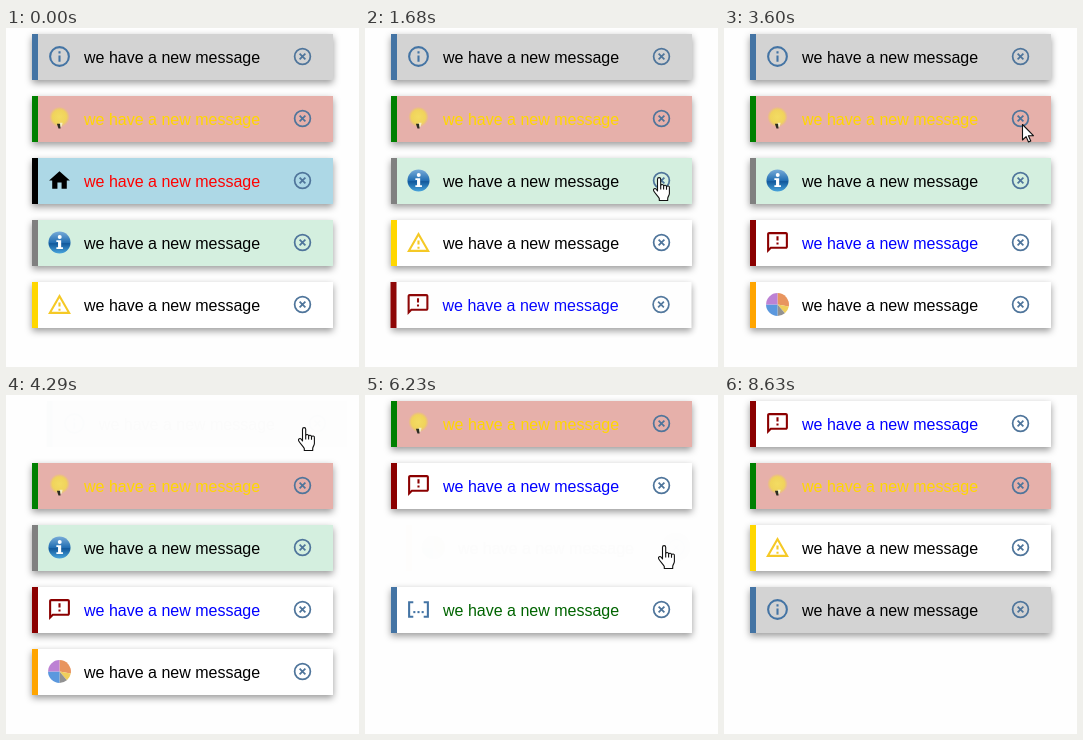
Animation, 353 px wide and 339 px high, one loop 9.87 s. Source, as an HTML page:

```html
<!DOCTYPE html>
<html lang="en">
<head>
<meta charset="utf-8">
<title>Toast messages</title>
<style>
  html, body { margin: 0; width: 100%; height: 100%; overflow: hidden; background: #fefefe; }
  #stage { position: relative; width: 353px; height: 339px; overflow: hidden; }
  .toast {
    position: absolute; left: 26px; top: 0; width: 301px; height: 46px;
    box-sizing: border-box; border-left: 6px solid;
    box-shadow: 0 3px 7px rgba(0, 0, 0, .4);
    font: 16px/48px "Liberation Sans", Arial, sans-serif;
  }
  .toast span { position: absolute; left: 46px; top: 0; white-space: nowrap; }
  .toast svg { position: absolute; }
  .icon { left: 9px; top: 10px; width: 25px; height: 25px; }
  .close {
    position: absolute; left: 250px; top: 8px; width: 28px; height: 28px; border-radius: 50%;
  }
  .close.hover { background: rgba(70, 130, 180, .16); }
  .close svg { left: 3.5px; top: 3.5px; width: 21px; height: 21px; }
  #cursor { position: absolute; left: -.5px; top: 0; }
  #cursor path { fill: #fff; stroke: #111; stroke-width: 1.1; stroke-linejoin: round; }
</style>
</head>
<body>
<div id="stage">
  <svg id="cursor" width="20" height="27" viewBox="0 0 20 27">
    <path id="arrow" d="M6.5 1.5V17l3.6-3.4 2.4 5.4 2.3-1-2.4-5.3h5z"/>
    <g id="hand">
      <path d="M5.5 15V3.2a1.6 1.6 0 0 1 3.2 0V9.6a1.5 1.5 0 0 1 2.9.2v.5a1.5 1.5 0 0 1 2.9.3v.6a1.4 1.4 0 0 1 2.9.5V17.5c0 2-1.7 3.2-1.7 5V24.5H7.3V22.5C6 20 3.3 17.8 1.6 14.8 1 13 3 11.8 4.2 13.2z"/>
      <path d="M8.7 9.5v4M11.6 10.3v3.2M14.5 11v2.7"/>
    </g>
  </svg>
</div>
<script>
const LOOP = 9870, FADE = 300, SHIFT = 15, ROW = 62, REFILL = 8240;
const stage = document.getElementById('stage');
const cursor = document.getElementById('cursor');
const arrow = document.getElementById('arrow');
const hand = document.getElementById('hand');
const blue = '#4474a4';

const svg = (body, cls = '') => `<svg class="${cls}" viewBox="0 0 24 24">${body}</svg>`;
const glyph = (color, d) => `<path fill="${color}" d="${d}"/>`;
const disc = (x, y, r, fill) => `<circle cx="${x}" cy="${y}" r="${r}" fill="${fill}"/>`;
const ring = color => `<circle cx="12" cy="12" r="9" fill="none" stroke="${color}" stroke-width="2"/>`;
const wedge = (color, a, b) => {
  const at = deg => {
    const r = deg * Math.PI / 180;
    return `${12 + 11 * Math.sin(r)} ${12 - 11 * Math.cos(r)}`;
  };
  return glyph(color, `M12 12L${at(a)}A11 11 0 0 1 ${at(b)}z`);
};

const icons = {
  info: ring(blue) + glyph(blue, 'M11 7h2v2h-2zM11 11h2v6h-2z'),
  bulb: `<radialGradient id="glow"><stop stop-color="#f3dc62"/><stop offset=".72" stop-color="#f0d35c"/>
    <stop offset="1" stop-color="#eec46c" stop-opacity=".25"/></radialGradient>` +
    disc(12, 10.5, 9.5, 'url(#glow)') + glyph('#f6efc4', 'M12 16h3l-1 4h-2z') +
    glyph('#2b2b22', 'M9.5 17h3l.5 4.5h-2z'),
  home: glyph('#000', 'M10 20v-6h4v6h5v-8h3L12 3 2 12h3v8z'),
  ball: `<linearGradient id="sky" x2="0" y2="1"><stop stop-color="#79acd9"/>
    <stop offset=".5" stop-color="#236fb3"/><stop offset=".55" stop-color="#12599c"/>
    <stop offset="1" stop-color="#48a4dc"/></linearGradient>` +
    disc(12, 12, 10.6, 'url(#sky)') + disc(12.2, 6.7, 1.9, '#fff') +
    glyph('#fff', 'M9 9.8h4.6v6.7h1.7v1.7H9v-1.7h1.6v-5H9z'),
  warn: glyph('#f5c926', 'M12 6L19.5 19h-15L12 6M12 2L1 21h22L12 2zm1 14h-2v2h2v-2zm0-6h-2v4h2v-4z'),
  note: glyph('#8b0000', 'M20 2H4c-1.1 0-2 .9-2 2v18l4-4h14c1.1 0 2-.9 2-2V4c0-1.1-.9-2-2-2zm0 14H5.2L4 17.2V4h16zM11 12h2v2h-2zM11 6h2v4h-2z'),
  pie: wedge('#e8955f', 0, 100) + wedge('#efcf5c', 100, 140) + wedge('#929292', 140, 180) +
    wedge('#5b98de', 180, 270) + wedge('#bd82d4', 270, 360),
  array: glyph(blue, 'M2 4h5v2H4v12h3v2H2zM22 4h-5v2h3v12h-3v2h5z') +
    [7, 11, 15].map(x => glyph(blue, `M${x} 13.5h2v2h-2z`)).join('')
};
const cross = svg(ring('#4f759b') + '<path d="M8.7 8.7l6.6 6.6m0-6.6l-6.6 6.6" stroke="#4f759b" stroke-width="2"/>');

// icon, border, background, text colour
const kinds = {
  A: ['info', blue, '#d3d3d3', '#000'],
  B: ['bulb', '#008000', '#e6b0aa', '#ffd700'],
  C: ['home', '#000', '#add8e6', '#f00'],
  D: ['ball', '#808080', '#d4efdf', '#000'],
  E: ['warn', '#ffd700', '#fff', '#000'],
  F: ['note', '#8b0000', '#fff', '#00f'],
  G: ['pie', '#ffa500', '#fff', '#000'],
  H: ['array', blue, '#fff', '#006400']
};

// Each click closes one toast; "next" joins the end once it has faded.
const clicks = [
  { key: 'C', next: 'F', at: 1150, arrive: 670, x: 287, y: 148 },
  { key: 'E', next: 'G', at: 2575, arrive: 2130, x: 294, y: 217 },
  { key: 'A', next: 'H', at: 4030, arrive: 3910, x: 291, y: 31 },
  { key: 'D', next: '', at: 5080, arrive: 4830, x: 288, y: 104 },
  { key: 'G', next: '', at: 5960, arrive: 5520, x: 292, y: 149 },
  { key: 'H', next: '', at: 7160, arrive: 7010, x: 292, y: 149 }
];
const cursorOn = 130, cursorOff = 7390;

const toasts = {};
for (const [key, [icon, edge, back, ink]] of Object.entries(kinds)) {
  const el = document.createElement('div');
  el.className = 'toast';
  el.style.cssText = `border-color:${edge};background:${back};color:${ink}`;
  el.innerHTML = svg(icons[icon], 'icon') + '<span>we have a new message</span>' +
    `<div class="close">${cross}</div>`;
  stage.insertBefore(el, cursor);
  toasts[key] = { el, close: el.querySelector('.close') };
}

// cubic-bezier(.25, .1, .25, 1)
function ease(x) {
  if (x <= 0) return 0;
  if (x >= 1) return 1;
  const curve = (s, a, b) => 3 * s * (1 - s) ** 2 * a + 3 * s * s * (1 - s) * b + s ** 3;
  let lo = 0, hi = 1;
  for (let i = 0; i < 20; i++) {
    const mid = (lo + hi) / 2;
    if (curve(mid, .25, .25) < x) lo = mid; else hi = mid;
  }
  return curve(lo, .1, 1);
}

function orderAt(t) {
  if (t >= REFILL) return 'FBEA';
  return clicks.filter(c => t >= c.at + FADE)
    .reduce((order, c) => order.replace(c.key, '') + c.next, 'ABCDE');
}

function drawToasts(t) {
  const order = orderAt(t), fresh = t >= REFILL;
  for (const [key, { el, close }] of Object.entries(toasts)) {
    const row = order.indexOf(key);
    el.style.display = row < 0 ? 'none' : 'block';
    if (row < 0) continue;
    const opener = clicks.find(c => c.next === key);
    const closer = fresh ? null : clicks.find(c => c.key === key);
    const start = fresh ? REFILL - 60 : opener ? opener.at + FADE : -FADE;
    const shown = ease((t - start) / FADE);
    const gone = closer ? ease((t - closer.at) / FADE) : 0;
    const dx = SHIFT * (gone + shown - 1);
    el.style.transform = `translate(${dx}px, ${6 + ROW * row}px)`;
    el.style.opacity = shown * (1 - gone);
    close.classList.toggle('hover', !!closer && t >= closer.arrive + 100);
  }
}

// An arrow while travelling, a hand once it rests on a button.
function drawCursor(t) {
  const on = t >= cursorOn && t < cursorOff;
  cursor.style.display = on ? 'block' : 'none';
  if (!on) return;
  let from = { x: 299, y: 318 }, leave = cursorOn, pos = from, resting = false;
  for (const c of clicks) {
    if (t < leave) break;
    const u = Math.min(1, (t - leave) / (c.arrive - leave)), s = u * u * (3 - 2 * u);
    pos = { x: from.x + (c.x - from.x) * s, y: from.y + (c.y - from.y) * s };
    resting = u === 1;
    from = c;
    const following = clicks[clicks.indexOf(c) + 1];
    leave = following ? Math.min(c.at + 550, following.arrive - 150) : cursorOff;
  }
  cursor.style.transform = `translate(${Math.round(pos.x)}px, ${Math.round(pos.y)}px)`;
  hand.style.display = resting ? '' : 'none';
  arrow.style.display = resting ? 'none' : '';
}

const begin = performance.now();
function draw() {
  const t = (performance.now() - begin) % LOOP;
  drawToasts(t);
  drawCursor(t);
  requestAnimationFrame(draw);
}
draw();
</script>
</body>
</html>
```
